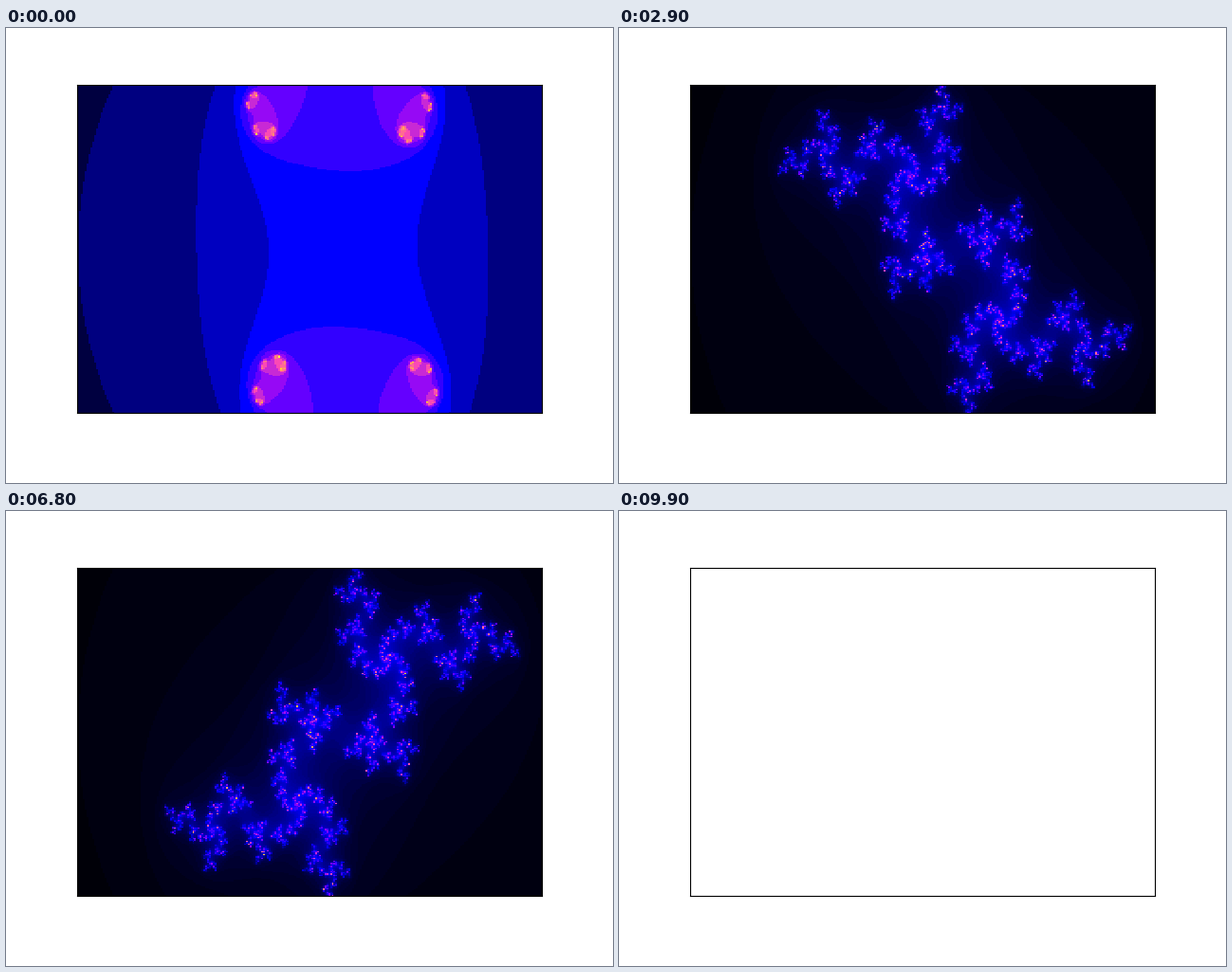
Recreate the animation shown at these times as a matplotlib script. Size 640 by 480 pixels, loop 10000 ms.

```python
import numpy as np
import matplotlib.pyplot as plt
from matplotlib.animation import FuncAnimation

W, H, DPI = 640, 480, 100
FRAMES, INTERVAL = 100, 100
GRID = 250
MAX_ITER = 200
RADIUS = 0.7885

re = np.linspace(-2, 1.5, GRID)
im = np.linspace(-1, 1, GRID)
plane = (re[None, :] + 1j * im[:, None]).ravel()


def julia(c):
    """Escape counts of z*z + c over the plane."""
    counts = np.full(plane.size, MAX_ITER)
    alive = np.arange(plane.size)
    z = plane.copy()
    for n in range(1, MAX_ITER):
        out = z.real ** 2 + z.imag ** 2 > 4
        counts[alive[out]] = n
        alive, z = alive[~out], z[~out]
        if alive.size == 0:
            break
        z = z * z + c
    return counts.reshape(GRID, GRID)


def color_top(counts):
    """Upper end of the colour scale: the maximum rounded up to a tick."""
    top = counts.max()
    span = top - counts.min()
    power = 10 ** np.floor(np.log10(span))
    ticks = 20 * power / span
    step = power * (0.2 if ticks > 10 else 0.5 if ticks > 4 else 1)
    return step * np.ceil(top / step - 1e-9)


fig = plt.figure(figsize=(W / DPI, H / DPI), dpi=DPI, facecolor="white")
ax = fig.add_axes([75 / W, 74 / H, 490 / W, 346 / H])
ax.set_xticks([])
ax.set_yticks([])
image = ax.imshow(np.zeros((GRID, GRID)), cmap="gnuplot2", origin="lower",
                  aspect="auto", interpolation="nearest")


def update(i):
    # The loop closes on an empty set of axes.
    shown = i < FRAMES - 1
    image.set_visible(shown)
    if shown:
        angle = 2 * np.pi * (i + 1) / (FRAMES - 1)
        counts = julia(RADIUS * np.exp(1j * angle))
        image.set_data(counts)
        image.set_clim(0, color_top(counts))
    return [image]


anim = FuncAnimation(fig, update, frames=FRAMES, interval=INTERVAL,
                     repeat=True, repeat_delay=0, blit=False)
plt.show()
```
